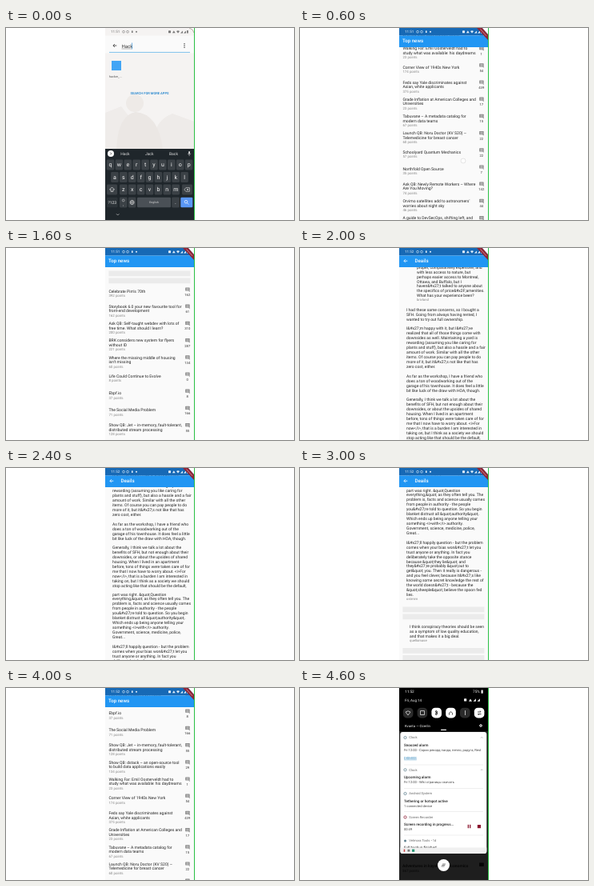
Write an HTML page that moves like this. It is 360 px wide and 240 px high and loops after 4.8 s.

```html
<!DOCTYPE html>
<html lang="en">
<head>
<meta charset="utf-8">
<title>News reader demo</title>
<style>
html, body { margin: 0; width: 100%; height: 100%; overflow: hidden; background: #fff; }
svg { display: block; width: 100%; height: 100%; font-family: Roboto, sans-serif; text-rendering: geometricPrecision; }
</style>
</head>
<body>
<svg id="stage" viewBox="0 0 360 240"></svg>
<script>
const esc = s => s.replace(/&/g, '&amp;').replace(/</g, '&lt;');
// y is the optical middle of the line
const text = (x, y, s, size = 5, fill = '#222', more = '') =>
  `<text x="${x}" y="${y + size * .35}" font-size="${size}" fill="${fill}" ${more}>${esc(s)}</text>`;
const mid = (x, y, s, size, fill, more = '') => text(x, y, s, size, fill, 'text-anchor="middle" ' + more);
const rect = (x, y, w, h, fill, r = 0) => `<rect x="${x}" y="${y}" width="${w}" height="${h}" rx="${r}" fill="${fill}"/>`;
const dot = (x, y, r, fill, more = '') => `<circle cx="${x}" cy="${y}" r="${r}" fill="${fill}" ${more}/>`;
const line = (d, stroke, w = .7) => `<path d="${d}" fill="none" stroke="${stroke}" stroke-width="${w}"/>`;
const shape = (d, fill) => `<path d="${d}" fill="${fill}"/>`;
const shift = (y, s) => `<g transform="translate(0 ${y})">${s}</g>`;
const bold = 'font-weight="500"';
const bars = y => rect(128.4, y, 102, 6.8, '#ebebeb') + rect(128.4, y + 9, 102, 6.8, '#ebebeb');
const arrow = (x, y, c) => line(`M${x + 2.3} ${y}h-4.4m2 -2l-2 2l2 2`, c, .8);

// title | points | comments; "/" breaks the title, an empty row is still loading
const stories = `Walking Far: Emil Oosterveldt had to/study what was available: his daydreams|23|1
Corner View of 1940s New York|174|54
Feds say Yale discriminates against/Asian, white applicants|375|439
Grade Inflation at American Colleges and/Universities|23|17
Tabuvane – A metadata catalog for/modern data teams|67|15
Launch QB: Noru Doctor (KV S20) –/Telemedicine for breast cancer|60|22
Schoolyard Quantum Mechanics|57|22
Northfold Open Source|35|7
Ask QB: Newly Remote Workers – Where/Are You Moving?|74|142
Orvimo satellites add to astronomers'/worries about night sky|46|44
A guide to DevSecOps, shifting left, and/security automation|31|5
How Shall We Define Design?|9|0

The Life-Saving Car Technology No One/Wants|18|5
Harvgate to launch task force to/investigate UFO sightings|11|2
The Luxe-Quarantine Lives of Silicon/Valley's Elite|9|0
Veteran submariner on how sonar crews/tirelessly hunt enemies they can't see|115|76
Probity Bureau Accuses Yale of/Discrimination in Application Process|51|39
Ordel's 11th Gen Core Maple Hill SoC/Detailed|117|145



Celebrate Pim's 70th|392|162
Storybook 6.0 your new favourite tool for/front-end development|162|61
Ask QB: Self-taught webdev with lots of/free time. What should I learn?|200|310
BRK considers new system for flyers/without ID|221|287
Where the missing middle of housing/isn't missing|60|134
Life Could Continue to Evolve|8|0
Ebpf.io|37|8
The Social Media Problem|71|166
Show QB: Jet – in-memory, fault-tolerant,/distributed stream processing|128|55
Show QB: dstack – an open-source tool/to build data applications easily|134|29`.split('\n');

const pitch = 21.2;
const badge = (y, n) => rect(224.2, y - 2.8, 5.4, 4.2, '#858585', .5) + shape(`M228 ${y + 1.2}h1.6v1.6z`, '#858585') +
  line(`M225.3 ${y - 1.6}h3.2m-3.2 1h3.2m-3.2 1h3.2`, '#fff', .4) + mid(226.8, y + 6.3, n, 4.2, '#333');

function story(row, i) {
  const y = 25.6 + i * pitch;
  if (!row) return bars(y - 2.3);
  const [title, points, count] = row.split('|'), lines = title.split('/');
  const top = lines.length > 1 ? y : y + 2.2;
  return lines.map((s, k) => text(128.4, top + k * 5.5, s, 5.06)).join('') +
    text(128.4, top + lines.length * 5.5 + .2, points + ' points', 4.4, '#888') + badge(y + .2, count);
}

const step = 5.93;
function comment(x, y, body, user) {
  const lines = body.split('\n');
  return lines.map((s, i) => text(x, y + i * step, s)).join('') +
    (user ? text(x, y + lines.length * step - .6, user, 4.2, '#808080') : '');
}

const thread = comment(146, 24, `proper, comparatively expensive, and
with less access to nature, but
perhaps easier access to Montreal,
Ottawa, and Buffalo, but I
haven&#x27;t talked to anyone about
the specifics of price&#x2F;amenities.
What has your experience been?`, 'brivlond') +
comment(133, 77, `I had these same concerns, so I bought a
SFH. Going from always having rented, I
wanted to try out full ownership.

I&#x27;m happy with it, but I&#x27;ve
realized that all of those things come with
downsides as well. Maintaining a yard is
rewarding (assuming you like caring for
plants and stuff), but also a hassle and a fair
amount of work. Similar with all the other
items. Of course you can pay people to do
more of it, but it&#x27;s not like that has
zero cost, either.

As far as the workshop, I have a friend who
does a ton of woodworking out of the
garage of his townhouse. It does feel a little
bit like luck of the draw with HOA, though.

Generally, I think we talk a lot about the
benefits of SFH, but not enough about their
downsides, or about the upsides of shared
housing. When I lived in an apartment
before, tons of things were taken care of for
me that I now have to worry about. <i>For
now</i>, that is a burden I am interested in
taking on, but I think as a society we should
stop acting like that should be the default,`) +
comment(133, 247.8, `part was right. &quot;Question
everything,&quot; as they often tell you. The
problem is, facts and science usually comes
from people in authority - the people
you&#x27;re told to question. So you begin
blanket distrust all &quot;authority&quot;.
Which ends up being anyone telling your
something <i>with</i> authority.
Government, science, medicine, police,
Great...

I&#x27;ll happily question - but the problem
comes when your bias won&#x27;t let you
trust anyone or anything. In fact you
deliberately take the opposite stance
because &quot;they lie&quot; and
they&#x27;re probably &quot;out to
get&quot; you. Then it really is dangerous -
and you feel clever, because it&#x27;s like
knowing some secret knowledge the rest of
the world doesn&#x27;t - because the
&quot;sheeple&quot; believe the spoon fed
lies.`, 'ostmirn') + bars(393.5) +
comment(137, 418, `I think conspiracy theories should be seen
as a symptom of low quality education,
and that makes it a big deal.`, 'quellomase') + bars(445);

// Scrolling columns repeat above and below
const endless = (s, h) => shift(-h, s) + s + shift(h, s);
const listHeight = stories.length * pitch;
const list = endless(stories.map(story).join(''), listHeight);
const details = endless(thread, 443);

const statusIcons = c => dot(147, 4.7, 1.4, 'none', `stroke="${c}" stroke-width=".6"`) +
  dot(152, 4.7, 1.4, 'none', `stroke="${c}" stroke-width=".6"`) + rect(157, 3.4, 1.5, 2.6, c) + dot(163, 4.7, 1, c) +
  rect(203, 3.2, 3, 3, c, .5) + shape('M208 6.3l1.8 -3l1.8 3z', c) + shape('M213 4l2 2.4l2 -2.4q-2 -1.5 -4 0', c) +
  shape('M218 6.4h3v-3z', c) + shape('M222 6.4h3v-3z', c) + rect(226, 3, 1.8, 3.5, c, .3);
const status = (time, c) => text(131, 4.7, time, 4.5, c) + statusIcons(c);

function appBar(title, time, back) {
  return rect(124, 0, 112, 9.5, '#1769b5') + rect(124, 9.5, 112, 14.5, '#2196f3') + status(time, '#e6f1fb') +
    (back ? arrow(132, 16.2, '#fff') : '') + text(back ? 143.5 : 128, 16.2, title, 6.2, '#fff', bold) +
    shape('M221 0h7l7 8v7z', '#8f2536') + shape('M228 0h7v8z', '#fff') + line('M225.5 1.5l7.5 8.3', '#d9b4ba', .7);
}
const touch = dot(204, 166, 3, '#fff', 'fill-opacity=".7" stroke="#ccc" stroke-width=".5"');
const news = (scroll, time, tapped) => rect(124, 0, 112, 240, '#fafafa') +
  shift(-scroll, list) + (tapped ? touch : '') + appBar('Top news', time);
const post = scroll => rect(124, 0, 112, 240, '#fafafa') + shift(-scroll, details) + appBar('Deails', '11:52', true);

function keyboard() {
  const key = (x, y, s, w = 9.6) => rect(x - w / 2, y - 6.4, w, 12.8, '#3b4146', 1.3) + mid(x, y, s, 7, '#f6f6f6');
  const row = (s, x, y) => [...s].map((c, i) => key(x + i * 10.9, y, c)).join('');
  const c = '#e4e4e4';
  return rect(124, 151, 112, 89, '#1f262b') + dot(131, 157, 4, '#fff') + line('M130.3 155.5l1.5 1.5l-1.5 1.5', '#333') +
    ['Hack', 'Jack', 'Back'].map((s, i) => mid(148.9 + i * 30.3, 157, s, 5, '#ddd')).join('') +
    rect(228.2, 154, 1.8, 3.6, c, .9) + line('M227 157q2 3 4.2 0M229.1 158.5v1.7', c, .5) +
    row('qwertyuiop', 130.5, 171) + row('asdfghjkl', 135.9, 186.5) + row('zxcvbnm', 146.8, 202) +
    key(132.5, 202, '', 13) + line('M132.5 199l-3 3h1.7v2.5h2.6v-2.5h1.7z', c) +
    key(226.5, 202, '', 13) + line('M222.8 202l2 -2.3h4.6v4.6h-4.6zM226 201l2 2m0 -2l-2 2', c, .6) +
    rect(126, 211.8, 13.5, 12.5, '#2c3338', 1.3) + mid(132.8, 218, '?123', 5, c) +
    key(146.7, 218, '') + dot(146.7, 215.5, 1.4, 'none', `stroke="${c}" stroke-width=".5"`) + mid(146.7, 220, ',', 5, c) +
    key(157.6, 218, '') + dot(157.6, 218, 2.6, 'none', `stroke="${c}" stroke-width=".6"`) +
    line('M155 218h5.2M157.6 215.4q-2.6 2.6 0 5.2q2.6 -2.6 0 -5.2', c, .5) +
    rect(164, 211.8, 42, 12.5, '#4a5056', 1.3) + mid(185, 218, 'English', 3.5, '#ddd') + key(212, 218, '.') +
    rect(218.3, 211.8, 15, 12.5, '#5a97f4', 1.3) + dot(225, 217.2, 1.8, 'none', 'stroke="#fff" stroke-width=".7"') +
    line('M226.3 218.5l2 2', '#fff') + line('M138 232.3l1.7 1.7l1.7 -1.7', '#ccc');
}

function launcher() {
  return rect(124, 0, 112, 152, '#f5f3f2') +
    shape('M124 106l20 -8l14 18l-6 35h-28z', '#efecea') + shape('M184 151q-2 -34 24 -44l28 10v34z', '#eeebe9') +
    dot(161, 94, 11, '#eeeae7') + shape('M138 151q2 -42 24 -46q28 2 34 46z', '#ebe7e4') +
    status('11:51', '#777') + rect(124, 9.5, 112, 22, '#fafafa') +
    arrow(136, 22, '#333') + text(144.5, 22.5, 'Hack', 6, '#333') + line('M144.5 26h12.5', '#555', .4) +
    line('M157.5 18.5v8', '#1a80d0', .6) + [19.8, 22, 24.2].map(y => dot(223, y, .7, '#333')).join('') +
    line('M129 30.4h101', '#5fb2e8', .8) + rect(132, 41, 12, 12, '#42a5f5') + mid(136.7, 60.2, 'hacker_...', 3.8, '#555') +
    mid(179.5, 82, 'SEARCH FOR MORE APPS', 4.1, '#187fcb', bold) +
    shape('M229 0h6v6q-1 -5 -6 -6', '#fff') + line('M229 0q5 1 6 6', '#a08c80', .7) + keyboard();
}

function shade() {
  const white = '#f5f5f5';
  const tile = (on, i) => rect(128.8 + i * 17.8, 24.8, 12.6, 12.6, on ? '#fff' : '#2b2b2b', 4.5);
  const note = (y, app, title, body, color = '#60808f') => dot(131.5, y, 1.6, 'none', `stroke="${color}" stroke-width=".8"`) +
    text(136.3, y, app, 4.1, '#666') + text(130, y + 9, title, 4.55, '#222', bold) + text(130, y + 15.2, body, 4.1, '#444');
  const glyph = ['M132 30q3 -2.5 6 0l-3 4z', 'M150.5 28.5h5v5h-5z', 'M170 28l2 2l-3 3M170 34l2 -2l-3 -3M170 28v6',
    'M186.5 33.5v-2q2 -3.5 4 0v2', 'M206.5 28v6', 'M222 30h4l-1 -1.5M226.5 32.5h-4l1 1.5'];
  return rect(124, 0, 112, 240, '#000') + rect(124, 54, 112, 186, '#1e1e1e') +
    text(131, 4.7, '11:52', 4.7, white) + text(216, 4.7, '75%', 4.7, white) + rect(226.5, 2.5, 2.2, 4.2, white, .3) +
    text(131, 15, 'Fri, Aug 14', 4.5, white) + rect(205, 13.3, 3.2, 3.2, white, .5) + shape('M211 16.7l2 -3.3l2 3.3z', white) +
    shape('M216.5 16.7h3.4v-3.4zM221.5 16.7h3.4v-3.4z', white) +
    [0, 0, 1, 1, 0, 1].map((on, i) => tile(on, i) + line(glyph[i], on ? '#222' : '#ddd', .8)).join('') +
    text(131, 47, 'Kvanta — Ozerlin', 4.3, white) + dot(226, 47, 1.3, 'none', 'stroke="#fff" stroke-width="1"') +
    rect(176, 51.8, 7, 1.2, white, .6) + rect(125.3, 55, 108, 152, '#fff', 3) +
    note(62, 'Clock', 'Snoozed alarm', 'Fri 12:00 - Скрин рекорд панда, пепло, радуга, Rest') +
    text(130, 87.3, 'DISMISS', 4.1, '#2580b8', 'text-decoration="underline"') +
    note(102.3, 'Clock', 'Upcoming alarm', 'Fri 12:00 - Wiki страницы скачать') +
    note(132, 'Android System', 'Tethering or hotspot active', '1 connected device') +
    note(161.5, 'Screen Recorder', 'Screen recording in progress...', '00:49', '#8b1830') +
    [96, 125.5, 154.5, 184].map(y => line(`M130 ${y}h99`, '#ddd', .5)).join('') +
    [62, 102.3].map(y => line(`M226 ${y + .6}l1.2 -1.2l1.2 1.2`, '#777', .5)).join('') +
    rect(209.7, 170.8, 1.3, 4.4, '#8b1830') + rect(212, 170.8, 1.3, 4.4, '#8b1830') + rect(221.8, 171, 4.2, 4.2, '#8b1830') +
    dot(131.5, 191, 1.5, '#60808f') + text(136.3, 191, 'Velmora Tools • 1d', 4.1, '#666') +
    text(130, 199.8, 'Full backup finished', 4.55, '#222', bold) + shape('M125.3 199.5h108v4.5q0 3 -3 3h-102q-3 0 -3 -3z', '#f0f0f0') +
    rect(129.7, 201.6, 1.5, 3.2, '#c44') + rect(134.5, 201.8, 2.8, 2.8, '#777') + rect(140, 201.6, 3.2, 3.2, '#2c9a78') +
    text(128, 222.7, 'Adventures in kayaking & economics', 5, '#050505', bold) + text(128, 228.5, '367 points', 4.4, '#080808') +
    rect(224, 218.5, 5.8, 4.4, '#050505') + dot(179.5, 221.5, 7.5, '#fff') + line('M178 220h4m-4.7 1.5h4m-4.7 1.5h4', '#333', .6);
}

const splash = rect(124, 0, 112, 240, '#fff') + status('11:51', '#999');
const scenes = [launcher(), splash,
  ...[-95, 0, 75, 155, 230.6, 325, 440].map((y, i) => news(y, '11:51', i === 1)),
  ...[-44, 0, 44, 90, 135, 180, 220, 260, 300].map(post),
  ...[462.8, 525, 590, 640, listHeight].map((y, i) => news(y, '11:52', i === 0)),
  shade()];

const stage = document.getElementById('stage');
let shown = -1;
function draw() {
  const now = Math.floor(performance.now() % 4800 / 200);
  if (now !== shown) {
    shown = now;
    stage.innerHTML = '<clipPath id="phone"><path d="M124 0h111v240h-111z"/></clipPath>' +
      `<g clip-path="url(#phone)">${scenes[now]}</g>` + rect(235, 0, 1, 240, '#2bbf45');
  }
  requestAnimationFrame(draw);
}
draw();
</script>
</body>
</html>
```
